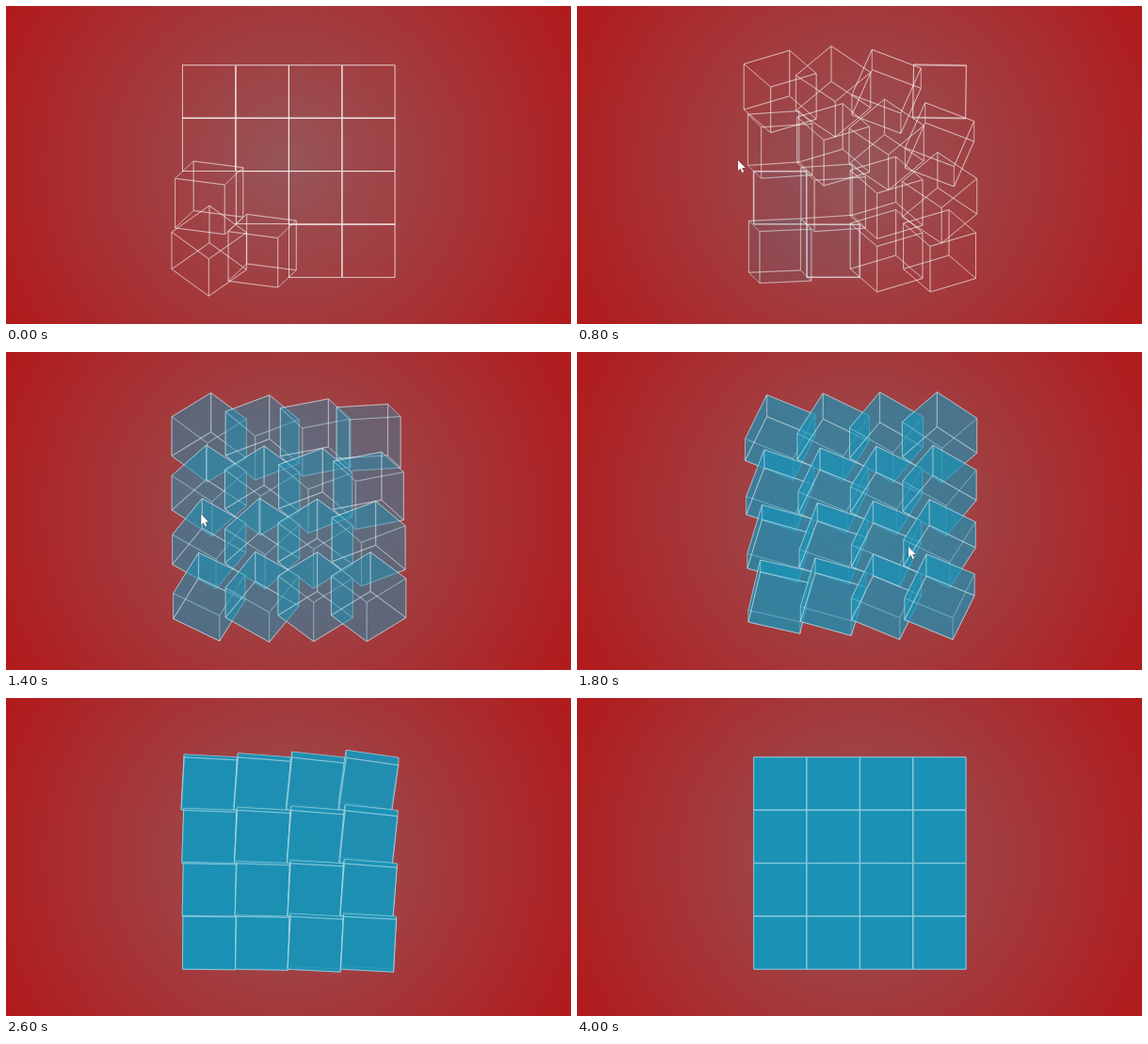
Write an HTML page with a canvas that moves like this. It is 600 px wide and 338 px high and loops after 4.3 s.

```html
<!DOCTYPE html>
<html lang="en">
<head>
<meta charset="utf-8">
<title>Cube wave</title>
<style>
  html, body { margin: 0; width: 100%; height: 100%; overflow: hidden; background: #a83436; }
  canvas { display: block; width: 600px; height: 338px; }
</style>
</head>
<body>
<canvas id="stage"></canvas>
<script>
const W = 600, H = 338, LOOP = 4300, STEP = 100;
const GRID = 4, SIZE = 56.45, HALF = SIZE / 2, LEFT = 215.7, TOP = 90.9, LINE = 0.5;
const BLUE = '26,146,182';
const TURN_STEPS = 30;

// [time, steps since the last cube in the wave began to turn]
const CLOCK = [[0, -4.2], [500, 0.3], [1000, 6], [LOOP, 38.3]];
// [time, x, y] of the pointer tip
const POINTER = [[1300, 171, 164], [1800, 352, 207], [2200, 144, 279], [2500, 46, 325]];

const canvas = document.getElementById('stage');
const ctx = canvas.getContext('2d');
const dpr = window.devicePixelRatio || 1;
canvas.width = Math.round(W * dpr);
canvas.height = Math.round(H * dpr);

const clamp = (v, lo, hi) => Math.min(hi, Math.max(lo, v));
const bezier = (p1, p2, s) => 3 * (1 - s) ** 2 * s * p1 + 3 * (1 - s) * s * s * p2 + s ** 3;

// Linear path through a few keys; i picks the value
function track(keys, t, i) {
  const n = clamp(keys.findIndex(key => t < key[0]), 1, keys.length - 1);
  const [a, b] = [keys[n - 1], keys[n]];
  return a[i] + (b[i] - a[i]) * clamp((t - a[0]) / (b[0] - a[0]), 0, 1);
}

// cubic-bezier(.215, .61, .355, 1)
function easeOut(x) {
  if (x <= 0 || x >= 1) return clamp(x, 0, 1);
  let lo = 0, hi = 1;
  for (let i = 0; i < 24; i++) {
    const mid = (lo + hi) / 2;
    if (bezier(0.215, 0.355, mid) < x) lo = mid; else hi = mid;
  }
  return bezier(0.61, 1, lo);
}

// The wave runs from the lower left corner; one cube in the bottom row lags a step
function delay(row, col) {
  const late = row === 3 && col === 2 ? 1 : 0;
  return col + GRID - 1 - row + late;
}

function place(a, b, c, d, x, y) {
  ctx.setTransform(a * dpr, b * dpr, c * dpr, d * dpr, x * dpr, y * dpr);
}

function drawBackground() {
  place(1, 0, 0, 1, 0, 0);
  const g = ctx.createRadialGradient(W / 2, H / 2, 0, W / 2, H / 2, 335);
  g.addColorStop(0, '#965659');
  g.addColorStop(1, '#b11b1d');
  ctx.fillStyle = g;
  ctx.fillRect(0, 0, W, H);
}

function drawCube(cx, cy, angle, alpha) {
  const s = Math.sin(angle), c = Math.cos(angle);
  // rotateX(angle) rotateY(angle), orthographic
  const axes = [[c, s * s, -c * s], [0, c, s], [s, -s * c, c * c]];
  const faces = [];
  axes.forEach((n, i) => {
    for (const sign of [-1, 1]) {
      faces.push({ n, sign, u: axes[(i + 1) % 3], v: axes[(i + 2) % 3], z: n[2] * sign });
    }
  });
  faces.sort((p, q) => p.z - q.z);
  ctx.lineWidth = LINE;
  ctx.strokeStyle = 'rgba(255,255,255,.85)';
  ctx.fillStyle = `rgba(${BLUE},${alpha})`;
  for (const { n, sign, u, v, z } of faces) {
    if (Math.abs(z) < 0.002) continue;
    place(u[0], u[1], v[0], v[1], cx + n[0] * sign * HALF, cy + n[1] * sign * HALF);
    if (alpha > 0) ctx.fillRect(-HALF, -HALF, SIZE, SIZE);
    ctx.strokeRect(-HALF + LINE / 2, -HALF + LINE / 2, SIZE - LINE, SIZE - LINE);
  }
}

function drawPointer(t) {
  if (t < STEP || t > 2500) return;
  place(1, 0, 0, 1, track(POINTER, t, 1), track(POINTER, t, 2));
  const arrow = new Path2D('M0 0V11L2.5 8.8 4.4 13 6.2 12.2 4.4 8.1 7.8 8Z');
  ctx.lineWidth = 0.8;
  ctx.strokeStyle = 'rgba(70,30,35,.7)';
  ctx.stroke(arrow);
  ctx.fillStyle = '#fff';
  ctx.fill(arrow);
}

function draw(t) {
  const last = track(CLOCK, t, 1);
  drawBackground();
  for (let row = 0; row < GRID; row++) {
    for (let col = 0; col < GRID; col++) {
      const k = last + 2 * (GRID - 1) - delay(row, col);
      const angle = 1.5 * Math.PI * easeOut(k / TURN_STEPS);
      const alpha = clamp(((k + last + 3) / 2 - 7) / 21, 0, 1);
      drawCube(LEFT + col * SIZE, TOP + row * SIZE, angle, alpha);
    }
  }
  drawPointer(t);
}

const start = performance.now();
function frame() {
  const t = (performance.now() - start) % LOOP;
  draw(Math.floor(t / STEP) * STEP);
  requestAnimationFrame(frame);
}
frame();
</script>
</body>
</html>
```
